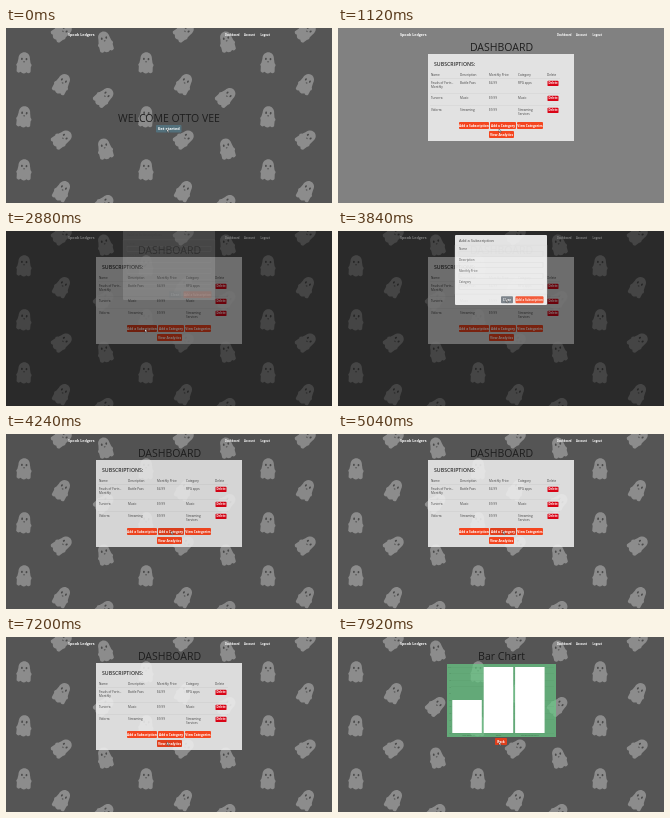
An HTML page with a canvas for the animation above (8 s loop, 326x175 px).

```html
<!DOCTYPE html>
<html lang="en">
<head>
<meta charset="utf-8">
<title>Subscription dashboard</title>
<style>
  html, body { margin: 0; width: 100%; height: 100%; overflow: hidden; background: #555; }
  canvas { display: block; width: 326px; height: 175px; }
</style>
</head>
<body>
<canvas id="stage"></canvas>
<script>
const W = 326, H = 175, LOOP = 8000, STEP = 80;
const canvas = document.getElementById('stage');
const ctx = canvas.getContext('2d');
const ratio = window.devicePixelRatio || 1;
canvas.width = W * ratio;
canvas.height = H * ratio;

const ORANGE = '#f4451f', RED = '#d90416', TEAL = '#5b7a86', INK = '#1e1e1e';
const DASHBOARD_AT = 880, GHOSTS_AT = 1280, CHART_AT = 7440;

const clamp = v => Math.max(0, Math.min(1, v));
const ramp = (t, start, length) => clamp((t - start) / length);
const smooth = p => p * p * (3 - 2 * p);

const cursorPath = [
  [0, 161, 101], [80, 161, 101], [160, 163, 100], [1120, 161, 101], [1700, 161, 101],
  [2480, 139, 98], [2880, 139, 98], [3600, 168, 68], [3820, 168, 68],
  [4240, 165, 97], [5040, 165, 97], [5500, 168, 41], [5700, 168, 41],
  [6000, 161, 105], [8000, 161, 105]
];

const dialogs = [
  { title: 'Add a Subscription', fields: ['Name', 'Description', 'Monthly Price', 'Category'],
    open: 2720, close: 3800 },
  { title: 'Add a Category', fields: ['Name'], open: 5040, close: 5680 }
];

const rows = [
  { y: 55, cells: ['Feuds of Forts -', 'Battle Pass', '$4.99', 'RPG apps'], extra: [93, 'Monthly'] },
  { y: 70, cells: ['Tunorra', 'Music', '$9.99', 'Music'] },
  { y: 82, cells: ['Vidorra', 'Streaming', '$9.99', 'Streaming'], extra: [180, 'Services'] }
];
const columns = [93, 122, 151, 180, 209];

// One tile of the wallpaper: x, y, rotation
const ghosts = [
  [18, 35, 0.05], [18, 89, 0.1], [56, 4, 0.95],
  [56, 56, 0.5], [99, 14, -0.25], [98, 69, 0.85]
];

let cursor = { x: 0, y: 0 };

function rect(x, y, w, h, fill, radius = 0) {
  ctx.fillStyle = fill;
  ctx.beginPath();
  ctx.roundRect(x, y, w, h, radius);
  ctx.fill();
}

function text(str, x, y, size, fill = '#444', align = 'left', weight = 400) {
  ctx.font = `${weight} ${size}px "Open Sans", sans-serif`;
  ctx.textAlign = align;
  ctx.textBaseline = 'alphabetic';
  ctx.fillStyle = fill;
  ctx.fillText(str, x, y + size * 0.36);
}

function button(label, x, y, w, h, fill, size = 3.2) {
  rect(x, y, w, h, fill, 0.9);
  const { x: cx, y: cy } = cursor;
  if (cx > x && cx < x + w && cy > y && cy < y + h) rect(x, y, w, h, 'rgba(0,0,0,.08)', 0.9);
  text(label, x + w / 2, y + h / 2, size, '#fff', 'center', 700);
}

function oval(x, y, rx, ry, fill) {
  ctx.fillStyle = fill;
  ctx.beginPath();
  ctx.ellipse(x, y, rx, ry, 0, 0, 7);
  ctx.fill();
}

function ghost(x, y, angle) {
  ctx.save();
  ctx.translate(x, y);
  ctx.rotate(angle);
  ctx.fillStyle = '#8c8c8c';
  ctx.fill(new Path2D('M-5.8-4C-5.8-13 5.8-13 5.8-4L6.6 0Q8.6 2 7 3.6L7 8.6Q5 11 3 9Q0 12-3 9Q-5 11-7 8.6L-7 3.6Q-8.6 2-6.6 0Z'));
  oval(-2.3, -4, 0.9, 1.2, '#4b4b4b');
  oval(2.3, -4, 0.9, 1.2, '#4b4b4b');
  oval(0, -1.2, 0.9, 0.7, '#5a5a5a');
  ctx.restore();
}

function background(loaded) {
  rect(0, 0, W, H, loaded ? '#555' : '#818181');
  if (!loaded) return;
  for (let dx = 0; dx <= 244; dx += 122)
    for (let dy = 0; dy <= 214; dy += 107)
      for (const [x, y, angle] of ghosts) ghost(x + dx, y + dy, angle);
}

function navigation() {
  text('Spook Ledgers', 62, 7, 3.7, '#fff', 'left', 700);
  text('Dashboard', 219, 7, 2.7, '#fff', 'left', 700);
  text('Account', 238, 7, 2.7, '#fff', 'left', 700);
  text('Logout', 254.5, 7, 2.7, '#fff', 'left', 700);
}

function welcome() {
  text('WELCOME OTTO VEE', 163, 90, 10.5, INK, 'center');
  button('Get started', 150, 97, 25.5, 7.5, TEAL, 3.9);
}

function dashboard() {
  text('DASHBOARD', 163.5, 19, 10.5, INK, 'center');
  rect(90, 26, 146, 87, 'rgba(240,240,240,.88)');
  text('SUBSCRIPTIONS:', 96, 36, 5.2, '#333', 'left', 600);
  ['Name', 'Description', 'Monthly Price', 'Category', 'Delete']
    .forEach((label, i) => text(label, columns[i], 46.5, 3.1));
  for (const { y, cells, extra } of rows) {
    rect(92, y - 5, 130, 0.3, 'rgba(0,0,0,.14)');
    cells.forEach((cell, i) => text(cell, columns[i], y, 3.1));
    if (extra) text(extra[1], extra[0], y + 4, 3.1);
    button('Delete', 209.5, y - 2.3, 11, 5.4, RED, 2.8);
  }
  button('Add a Subscription', 121, 94, 30, 7, ORANGE);
  button('Add a Category', 152, 94, 26, 7, ORANGE);
  button('View Categories', 179, 94, 26, 7, ORANGE);
  button('View Analytics', 151, 103, 25, 7, ORANGE);
}

function chart(t) {
  text('Bar Chart', 163.5, 19, 10.6, INK, 'center');
  rect(109, 27, 109, 73, 'rgba(104,202,134,.72)');
  for (let i = 0; i <= 10; i++) {
    const y = 96 - i * 6.6;
    text(String(i), 112.6, y, 2, '#3c6c4a', 'right');
    rect(113, y, 103, 0.2, 'rgba(40,90,55,.2)');
  }
  const grown = 1 - (1 - ramp(t, CHART_AT - STEP, 480)) ** 4;
  [['RPG apps', 33], ['Music', 66], ['Streaming Services', 66]].forEach(([label, height], i) => {
    const x = 114.3 + i * 31.4;
    rect(x, 96 - height * grown, 29.5, height * grown, '#fff');
    text(label, x + 14.7, 98, 2, '#3c6c4a', 'center');
  });
  button('Back', 157, 101, 12, 7, ORANGE, 3.2);
}

function dialog({ title, fields, open, close }, t) {
  const shade = ramp(t, open, 150) - ramp(t, close + 300, 150);
  if (shade <= 0) return;
  rect(0, 0, W, H, `rgba(0,0,0,${shade * 0.5})`);

  const shown = ramp(t, open + 120, 300) * (1 - ramp(t, close, 300));
  if (shown <= 0) return;
  const foot = 16 + fields.length * 11;
  ctx.save();
  ctx.globalAlpha = shown;
  ctx.translate(117, 5 - 7 * (1 - shown));
  rect(0, 0, 92, foot + 10, '#fff', 1);
  text(title, 4, 5, 4, '#333');
  ctx.strokeStyle = '#d4d4d4';
  ctx.lineWidth = 0.3;
  ctx.strokeRect(0, 10, 92, foot - 11);
  fields.forEach((field, i) => {
    const y = 14 + i * 11;
    text(field, 4, y, 2.9);
    ctx.strokeRect(4, y + 2.2, 84, 5.4);
  });
  button('Close', 46, foot + 1.3, 12, 6.8, '#6c757d');
  button(title, 60.5, foot + 1.3, 28, 6.8, ORANGE, 2.9);
  ctx.restore();
}

function moveCursor(t) {
  const i = cursorPath.findIndex(point => point[0] > t);
  const [t0, x0, y0] = cursorPath[i - 1], [t1, x1, y1] = cursorPath[i];
  const p = smooth((t - t0) / (t1 - t0));
  cursor = { x: x0 + (x1 - x0) * p, y: y0 + (y1 - y0) * p };
}

function drawCursor() {
  ctx.save();
  ctx.translate(cursor.x, cursor.y);
  const arrow = new Path2D('M0 0V3.2L.8 2.5 1.4 3.7 2 3.4 1.4 2.3H2.4Z');
  ctx.fillStyle = '#fff';
  ctx.strokeStyle = '#222';
  ctx.lineWidth = 0.4;
  ctx.fill(arrow);
  ctx.stroke(arrow);
  ctx.restore();
}

function draw(t) {
  ctx.setTransform(ratio, 0, 0, ratio, 0, 0);
  moveCursor(t);
  background(t < DASHBOARD_AT || t >= GHOSTS_AT);
  navigation();
  if (t < DASHBOARD_AT) welcome();
  else if (t < CHART_AT) dashboard();
  else chart(t);
  dialogs.forEach(d => dialog(d, t));
  drawCursor();
}

const begin = performance.now();
function tick() {
  const t = (performance.now() - begin) % LOOP;
  draw(Math.floor(t / STEP) * STEP);
  requestAnimationFrame(tick);
}
tick();
</script>
</body>
</html>
```
